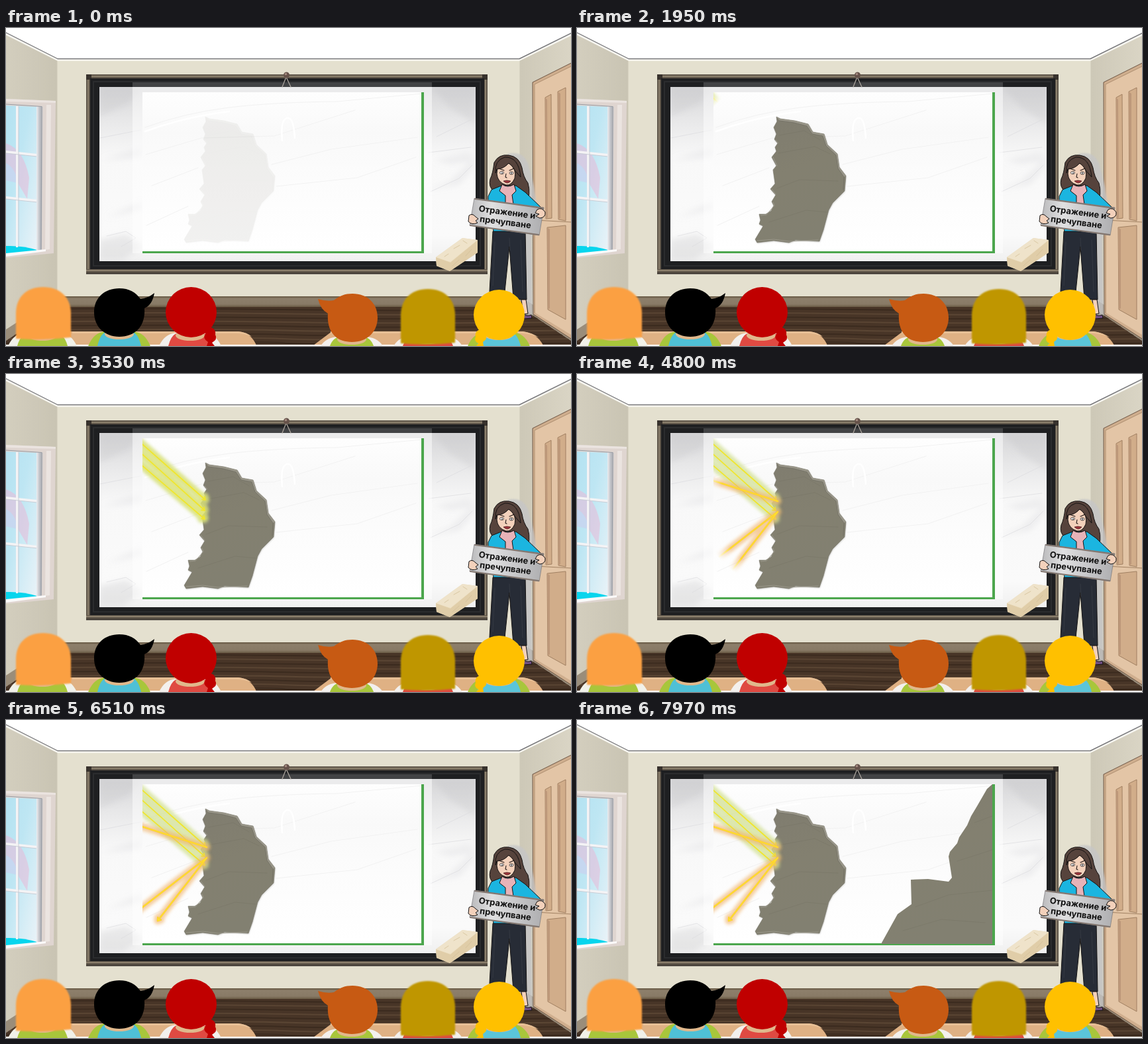
Recreate the animation shown at these times as an HTML page. Size 853x480 px, loop 8 s.

```html
<!DOCTYPE html>
<html lang="bg">
<head>
<meta charset="utf-8">
<title>Отражение и пречупване</title>
<style>
html, body { margin: 0; width: 100%; height: 100%; overflow: hidden; background: #fff; }
svg { display: block; width: 100vw; height: 100vh; }
.sign { font: 700 13px Inter, "Open Sans", sans-serif; fill: #111; text-anchor: middle; }
.ink { stroke: #151313; stroke-width: 1; stroke-linejoin: round; }
.line { fill: none; stroke-linecap: round; stroke-linejoin: round; }
</style>
</head>
<body>
<svg viewBox="0 0 853 480" preserveAspectRatio="none">
<defs>
  <linearGradient id="leftWall"><stop stop-color="#d3cebe"/><stop offset="1" stop-color="#c9c4b3"/></linearGradient>
  <linearGradient id="rightWall"><stop stop-color="#cdc8b7"/><stop offset="1" stop-color="#dad5c5"/></linearGradient>
  <linearGradient id="skirt" x2="0" y2="1"><stop stop-color="#62543f"/><stop offset=".2" stop-color="#8d7f6b"/><stop offset=".7" stop-color="#887a66"/><stop offset="1" stop-color="#65563f"/></linearGradient>
  <linearGradient id="sky" x2="1" y2="1"><stop stop-color="#b4e2f1"/><stop offset=".4" stop-color="#bee6f3"/><stop offset="1" stop-color="#eaf3f8"/></linearGradient>
  <linearGradient id="sash"><stop stop-color="#ededf0"/><stop offset=".6" stop-color="#b4b6bc"/><stop offset="1" stop-color="#d9d3d1"/></linearGradient>
  <linearGradient id="paper" x2="0" y2="1"><stop stop-color="#d6d6d8"/><stop offset=".18" stop-color="#e7e7e8"/><stop offset=".4" stop-color="#f8f8f8"/><stop offset=".85" stop-color="#fafafa"/><stop offset="1" stop-color="#f0f0f0"/></linearGradient>
  <linearGradient id="sheet" x2="0" y2="1"><stop stop-color="#fefefe"/><stop offset=".25" stop-color="#f9f9f9"/><stop offset=".55" stop-color="#fcfcfc"/><stop offset="1" stop-color="#fff"/></linearGradient>
  <linearGradient id="plate"><stop stop-color="#b8b8ba"/><stop offset=".3" stop-color="#e0e0e1"/><stop offset=".6" stop-color="#c9c9cb"/><stop offset="1" stop-color="#adadaf"/></linearGradient>
  <linearGradient id="stone" x2=".3" y2="1"><stop stop-color="#7f7c6f"/><stop offset=".5" stop-color="#838070"/><stop offset="1" stop-color="#828071"/></linearGradient>
  <linearGradient id="wipe" gradientUnits="userSpaceOnUse"><stop stop-color="#fff"/><stop offset="1" stop-color="#000"/></linearGradient>
  <radialGradient id="spread" gradientUnits="userSpaceOnUse" cx="303" cy="204" r="1"><stop offset=".8" stop-color="#fff"/><stop offset="1" stop-color="#000"/></radialGradient>
  <mask id="wipeMask" maskUnits="userSpaceOnUse" x="190" y="80" width="240" height="270"><path fill="url(#wipe)" d="M190 80h240v270H190z"/></mask>
  <mask id="spreadMask" maskUnits="userSpaceOnUse" x="190" y="80" width="240" height="270"><path fill="url(#spread)" d="M190 80h240v270H190z"/></mask>
  <clipPath id="panel"><path d="M206 97h421v241H206z"/></clipPath>
  <clipPath id="screen"><path d="M141 89h568v263H141z"/></clipPath>
  <clipPath id="floorClip"><path d="M77 421H776L853 472V478H0V472Z"/></clipPath>
  <filter id="glow" filterUnits="userSpaceOnUse" x="180" y="70" width="260" height="290"><feGaussianBlur stdDeviation="2.8"/></filter>
  <filter id="soft" x="-20%" y="-20%" width="140%" height="140%"><feGaussianBlur stdDeviation="1.3"/></filter>
  <filter id="haze" x="-30%" y="-30%" width="160%" height="160%"><feGaussianBlur stdDeviation="5"/></filter>
</defs>

<!-- Room -->
<path fill="#fff" d="M0 0h853v480H0z"/>
<path fill="#e4e0cf" d="M77 49H776V408H77Z"/>
<path fill="url(#leftWall)" d="M0 10L77 49V422L0 470Z"/>
<path fill="url(#rightWall)" d="M853 11L776 49V422L853 470Z"/>
<path class="line" stroke="#f7f6f0" stroke-width="2.4" d="M0 9.500L78 48.500H775L853 10.500"/>
<path class="line" stroke="#77777a" stroke-width="1.4" d="M0 7L78 46.500H775L853 8"/>
<path class="line" stroke="#cdc8b7" d="M77 50V405M776 50V405"/>
<path fill="url(#skirt)" d="M77 405H776V422H77Z"/>
<path fill="#9a8d7a" d="M77 405V422L0 472V455ZM776 405V422L853 472V455Z"/>
<g clip-path="url(#floorClip)">
  <path fill="#483527" d="M0 421h853v57H0z"/>
  <g id="planks" class="line"></g>
</g>

<!-- Window -->
<path fill="#dfd5d0" d="M0 107L75 110L72 340L0 347Z"/>
<path fill="#ebe4e0" d="M0 107L75 110V113L0 111ZM61 116L68 116L66 334L59 335Z"/>
<path fill="url(#sky)" d="M0 117L47 119V335L0 339Z"/>
<path fill="#e7bedb" opacity=".6" d="M0 174Q27 183 35 226L32 258L18 234Q14 211 0 204Z"/>
<path fill="#cfc9ee" opacity=".5" d="M0 204Q14 211 18 234L0 230Z"/>
<path fill="#08d5ed" d="M0 329Q25 328 47 335V337L0 341Z"/>
<path fill="#f4f3f5" d="M15 118H19L18 331H15ZM0 185L47 190V194L0 189ZM0 254L47 259V263L0 258Z"/>
<path class="line" stroke="#c0c6ce" stroke-width=".8" d="M19 118V330M0 189L47 194M0 258L47 263"/>
<path fill="url(#sash)" d="M46 118L56 119L54 335L46 336Z"/>
<path class="line" stroke="#989ca4" stroke-width="1.2" d="M0 115L54 118.500M54 119L53 334"/>
<path fill="#fbfafa" d="M0 340L60 334V337L0 345Z"/>

<!-- Door -->
<path fill="#cfae8e" d="M795 82L853 53V469L796 432Z"/>
<path fill="#e3c5a6" d="M798 85L853 58V463L799 430Z"/>
<path class="line" stroke="#6d5644" d="M853 53L795 82L796 432L853 469"/>
<path class="line" stroke="#a58667" stroke-width=".8" d="M798 430V85L853 58"/>
<g fill="#d1ad8a" stroke="#9a7a5c" stroke-width=".9">
  <path d="M814 105L823 100L824 287L815 288ZM833 96L845 90V291L834 289ZM817 301L845 298V440L818 425Z"/>
  <path fill="#bd987a" stroke="none" d="M814 105L817 108L818 286L815 288ZM833 96L837 99V287L834 289ZM817 301L821 304V423L818 425Z"/>
  <path fill="none" d="M799 290L853 293"/>
</g>

<!-- Board -->
<path fill="#5f564a" d="M121 70H727V371H121Z"/>
<path fill="#8b7f6c" d="M122 72H726V74H122ZM121 365H727V367H121ZM123 74H125V364H123ZM723 74H725V364H723Z"/>
<path fill="#38322d" d="M121 70H129V78H121ZM719 70H727V78H719ZM121 369.500H727V371.500H121Z"/>
<path fill="#1e1f21" d="M127 76H722V364H127Z"/>
<path fill="none" stroke="#2b2c2e" stroke-width="2" d="M132 81H716V359H132Z"/>
<path fill="url(#paper)" d="M141 89H709V352H141Z"/>
<g clip-path="url(#screen)">
  <g fill="#bcbcc0" filter="url(#haze)">
    <path opacity=".25" d="M141 89H205L185 115L141 133ZM642 89H709V145L671 121ZM141 320L182 310L205 331L176 350H141Z"/>
    <path opacity=".2" d="M635 245L671 231L704 199L709 207L685 236ZM646 199L700 188L709 200L671 205ZM141 200L205 181V195ZM150 286L205 262V274Z"/>
  </g>
  <path class="line" stroke="#dcdcde" opacity=".7" d="M144 131L204 104M142 166L203 154M152 314L181 307L196 317L174 330M638 188L702 180M641 247L684 227L704 207M650 164L703 138"/>
</g>
<path fill="#fff" opacity=".16" d="M191 82H643V89H191Z"/>
<path fill="#fff" opacity=".5" d="M191 89H643V340H191Z"/>
<path fill="url(#sheet)" d="M206 97H627V338H206Z"/>
<g clip-path="url(#panel)" class="line" stroke="#f2f2f2">
  <path d="M210 150Q270 128 337 120T500 111L628 99M211 191L295 166L405 163L527 124M401 206L491 183L621 165M212 298L275 269M408 239L530 226L619 195M220 238L290 211"/>
  <path stroke="#fff" stroke-width="2.500" d="M417 170Q414 139 424 136T436 166M210 156Q270 134 337 126"/>
</g>
<path fill="#4ca64d" d="M627 97H631V340H206V337H627Z"/>
<path class="line" stroke="#aaa39c" stroke-width="1.3" d="M417 89L423 74L430 89"/>
<circle cx="423.500" cy="71" r="4.500" fill="#66524a"/>
<circle cx="422.500" cy="69.500" r="1.700" fill="#a58b80"/>

<!-- Lesson -->
<g clip-path="url(#panel)">
  <g id="rock">
    <path id="rockShadow" fill="#77756d" opacity=".4" filter="url(#soft)" transform="translate(.5 1)"/>
    <path id="rockBody" fill="url(#stone)" stroke="#7b796d" stroke-width=".6"/>
    <path fill="#989588" d="M301 134L307 137L329 140L349 145L356 157L373 160L378 176L393 190L396 210L406 223L403 225L394 212L391 192L376 178L371 163L355 160L347 148L328 143L306 140Z"/>
    <path class="line" stroke="#706e63" stroke-width=".8" d="M306 140L328 143L347 148L355 160L371 163L376 178L391 192L394 212L403 225L402 244"/>
    <path class="line" stroke="#9a978a" d="M300 169L304 174M296 195L302 208M294 243L300 251M296 263L298 268L286 282L277 283M272 321L297 319L320 322L364 320"/>
    <path class="line" stroke="#747162" opacity=".4" d="M304 189L359 179L382 190M302 242L336 229L394 231M305 162L343 155L367 169M290 293L346 275L377 278"/>
  </g>
  <g id="incoming" mask="url(#wipeMask)"></g>
  <g id="reflected" mask="url(#spreadMask)"></g>
  <g id="slab">
    <path fill="url(#stone)" d="M627 97L619 104L604 130L595 145L589 159L577 177L574 186L563 199L561 206L566 238L561 244L530 240L504 241L505 278L484 293L459 338H627Z"/>
    <path class="line" stroke="#747162" opacity=".4" d="M600 155L627 145M574 213L627 196M511 282L561 264L627 257M492 318L550 301L616 306"/>
  </g>
</g>

<!-- Eraser -->
<path fill="#ebdcbc" d="M649 346L689 317L712 320V339L670 367L650 359Z"/>
<path fill="#e0cda8" d="M649 346L671 354L712 320V339L670 367L650 359Z"/>
<path fill="#efe3ca" d="M649 346L689 317L712 320L671 353Z"/>
<path class="line" stroke="#d3bf99" stroke-width=".8" d="M662 345L668 341M676 333L685 328M690 321L696 325M674 359L684 350M694 344L703 334"/>

<!-- Teacher -->
<path fill="#c6c6c7" opacity=".8" filter="url(#soft)" d="M757 190Q781 184 789 207L797 239L802 270L793 320L795 434L780 438L767 310Z"/>
<g class="ink">
  <path fill="#56433c" d="M737 203Q744 190 759 192Q775 194 779 211Q781 225 788 234Q793 252 785 265L768 257L737 247Q728 240 731 228Q735 220 737 203Z"/>
  <path fill="#1bb5e0" d="M733 244L748 238L770 238L784 248L808 271L801 285L782 279L781 312H736L735 284L728 274L728 254Z"/>
  <path fill="#f3d1bb" d="M742 209Q750 202 761 205Q771 213 768 227Q763 238 755 237Q742 233 741 220Z"/>
  <path fill="#e7b3b8" d="M749 236Q757 242 767 236L770 246L764 252L766 266L754 264L754 253L745 246Z"/>
  <path fill="#56433c" d="M739 219Q737 200 753 195Q774 194 777 225L769 216Q764 207 759 204Q751 213 741 213Z"/>
  <path fill="#272c36" d="M735 307H784L786 410L766 409L760 330L753 398H730Z"/>
  <path fill="#f3d1bb" d="M778 410H785L788 431L781 432Z"/>
  <path fill="#715083" d="M780 431Q787 436 793 433L794 438L782 439Z"/>
</g>
<g fill="#fff" stroke="#201715" stroke-width=".8">
  <ellipse cx="748.500" cy="218.500" rx="3" ry="2"/>
  <ellipse cx="763" cy="219" rx="3" ry="2"/>
</g>
<path class="line" stroke="#201715" stroke-width="1.1" d="M744 212L752 215M760 215L767 212M749 218V219.500M763 218V220M755 220L754 225L756 226"/>
<path fill="#9f353d" stroke="#3f1818" stroke-width=".7" d="M751 231Q756 229 762 231Q757 237 751 231Z"/>
<path class="line" stroke="#3b4048" stroke-width=".7" d="M760 317L761 336M738 323L735 389M777 320L780 398"/>
<path fill="url(#plate)" stroke="#777679" stroke-width=".7" d="M707 257L812 271L805 313L700 298Z"/>
<path class="line" stroke="#82766f" stroke-width="2" d="M708 258L811 272M701 298L804 312"/>
<g class="sign">
  <text transform="translate(756 282.500) rotate(7.500)">Отражение и</text>
  <text transform="translate(753.500 297.500) rotate(7.500)">пречупване</text>
</g>
<g fill="#f3d1bb" class="ink">
  <path d="M699 283Q704 279 709 285L713 288L709 291L712 294Q703 298 698 292Z"/>
  <path d="M802 274Q809 270 814 278Q815 286 806 287L800 284L805 281L799 279Z"/>
</g>

<!-- Pupils -->
<g fill="#dfb184">
  <path d="M94 458H351Q370 460 378 479H78ZM492 458H780Q802 461 811 479H464Z"/>
  <path fill="#e8c096" d="M100 458H350Q364 459 371 466Q360 461 347 461H100ZM490 458H780Q795 460 804 467Q793 462 780 461H490Z"/>
</g>
<path fill="#fff" d="M0 478H853V480H0Z"/>
<g id="bodies"></g>
<g fill="#fba043" filter="url(#soft)"><path d="M15 469V431C15 406 31 391 56 391S98 406 98 431V467Q57 472 15 469Z"/></g>
<path fill="#000" d="M133 429C133 407 149 393 171 393C186 393 196 399 203 409Q214 408 224 400Q221 418 209 423C211 450 195 466 171 466C149 466 133 451 133 429Z"/>
<g fill="#c00000"><ellipse cx="279.500" cy="429" rx="38.500" ry="38"/><path d="M299 451Q318 450 316 463Q320 470 311 475L315 480H303L305 474Q296 468 301 462Z"/></g>
<path fill="#c75a13" d="M471 409Q484 413 495 411C504 404 512 401 523 401C546 401 561 416 561 437S546 474 522 474S484 458 486 431Q475 425 471 409Z"/>
<g fill="#bf9600" filter="url(#soft)"><path d="M596 476V434C596 409 612 394 637 394S678 409 678 434V475Q637 480 596 476Z"/></g>
<g fill="#ffc000"><ellipse cx="744.500" cy="433" rx="38.500" ry="38"/><path d="M725 453Q706 455 709 466Q706 472 713 476L710 480H721L720 474Q728 469 724 463Z"/></g>
</svg>

<script>
const LOOP = 8000;
const $ = id => document.getElementById(id);
const clamp = v => Math.max(0, Math.min(1, v));

// Runs of steps: start, count, first interval; intervals alternate 130 and 60 ms.
const runs = [
  [1060, 9, 130], [1950, 9, 60], [2770, 9, 130], [3660, 9, 60], [4550, 9, 60],
  [5370, 9, 130], [6260, 9, 60], [7080, 8, 130], [7910, 2, 60]
];
const ticks = runs.flatMap(([start, count, gap]) =>
  Array.from({ length: count }, (_, i) =>
    start + 190 * Math.floor(i / 2) + (i % 2 ? gap : 0)));

const rockPath = "M301 134L307 137L329 140L349 145L356 157L373 160L378 176L393 190L396 210L406 223L404 246L386 264L380 275L372 305L366 322L330 320L320 324L297 321L272 324L269 319L281 299L275 296L277 290L275 281L285 281L293 276L297 268L294 262L300 252L292 243L299 235L296 214L301 208L294 195L301 186L299 180L303 174L298 168L301 160L297 150L302 141Z";
$("rockShadow").setAttribute("d", rockPath);
$("rockBody").setAttribute("d", rockPath);

function arrow([x1, y1, x2, y2], size = 5) {
  const a = Math.atan2(y2 - y1, x2 - x1);
  const wing = turn => `${x2 - size * Math.cos(a + turn)} ${y2 - size * Math.sin(a + turn)}`;
  return `M${x1} ${y1}L${x2} ${y2}M${wing(.6)}L${x2} ${y2}L${wing(-.6)}`;
}

function stroke(d, color, width, extra = "") {
  return `<path class="line" d="${d}" stroke="${color}" stroke-width="${width}" ${extra}/>`;
}

const inRays = [[190, 92, 301, 190], [190, 107, 300, 206], [190, 125, 300, 219]].map(r => arrow(r)).join("");
const outRays = [[303, 192, 190, 156], [303, 208, 190, 295], [303, 208, 229, 303]].map(r => arrow(r)).join("");

$("incoming").innerHTML =
  stroke(inRays, "#cfdf98", 12, 'filter="url(#glow)" opacity=".7"') +
  `<g id="sun">${stroke(inRays, "#e3e45a", 9, 'filter="url(#glow)" opacity=".6"')}</g>` +
  stroke(inRays, "#f0e62c", 1.8);
$("reflected").innerHTML =
  stroke(outRays, "#f0b46c", 11, 'filter="url(#glow)" opacity=".65"') +
  stroke(outRays, "#fbc832", 2.6) + stroke(outRays, "#ffe02e", 1.4);

function body(x, y, w, shirt, sleeve) {
  const half = w / 2;
  return `<path fill="${sleeve}" d="M${x - half - 14} 480Q${x - half - 5} ${y} ${x - half + 14} ${y}H${x + half - 14}Q${x + half + 5} ${y} ${x + half + 14} 480Z"/>` +
    `<path fill="${shirt}" d="M${x - half} 480Q${x - half + 5} ${y} ${x - 16} ${y}H${x + 16}Q${x + half - 5} ${y} ${x + half} 480Z"/>` +
    `<ellipse fill="#e0b88c" cx="${x}" cy="${y + 4}" rx="22" ry="8"/>`;
}
$("bodies").innerHTML =
  body(55, 460, 76, "#a8c63b", "#f1f1e9") + body(171, 458, 66, "#4fc0d6", "#a8c63b") +
  body(278, 460, 66, "#df4a42", "#f3f0ed") + body(522, 466, 66, "#a8c63b", "#f3f0ed") +
  body(637, 465, 76, "#df4a42", "#f3f0ed") + body(744, 459, 66, "#5bc5d9", "#a8c63b");

$("planks").innerHTML = Array.from({ length: 9 }, (_, i) => {
  const y = 425 + i * 6.3;
  return stroke(`M0 ${y}Q${160 + i * 31} ${y - 3} 420 ${y}T853 ${y}`, i % 2 ? "#5b4634" : "#3a2a1e", 1.8);
}).join("");

function setAttrs(node, attrs) {
  for (const [key, value] of Object.entries(attrs)) node.setAttribute(key, value);
}

function draw(t) {
  const n = ticks.filter(tick => tick <= t).length;
  const ray = n - 9, bounce = n - 27;

  $("rock").setAttribute("opacity", clamp(.1 + n * .1));
  $("slab").setAttribute("opacity", clamp((n - 62) * .1));

  $("incoming").style.display = ray > 0 ? "" : "none";
  const edge = 10 + 13 * ray, inner = edge - 26;
  setAttrs($("wipe"), { x1: 206 + inner / 2, y1: 97 + inner / 2, x2: 206 + edge / 2, y2: 97 + edge / 2 });
  $("sun").setAttribute("opacity", 1 - .8 * clamp(bounce / 9));

  $("reflected").style.display = bounce > 0 ? "" : "none";
  $("spread").setAttribute("r", Math.max(1, Math.min(200, bounce * 8.9)));
}

const origin = performance.now();
function frame() {
  draw((performance.now() - origin) % LOOP);
  requestAnimationFrame(frame);
}
frame();
</script>
</body>
</html>
```
